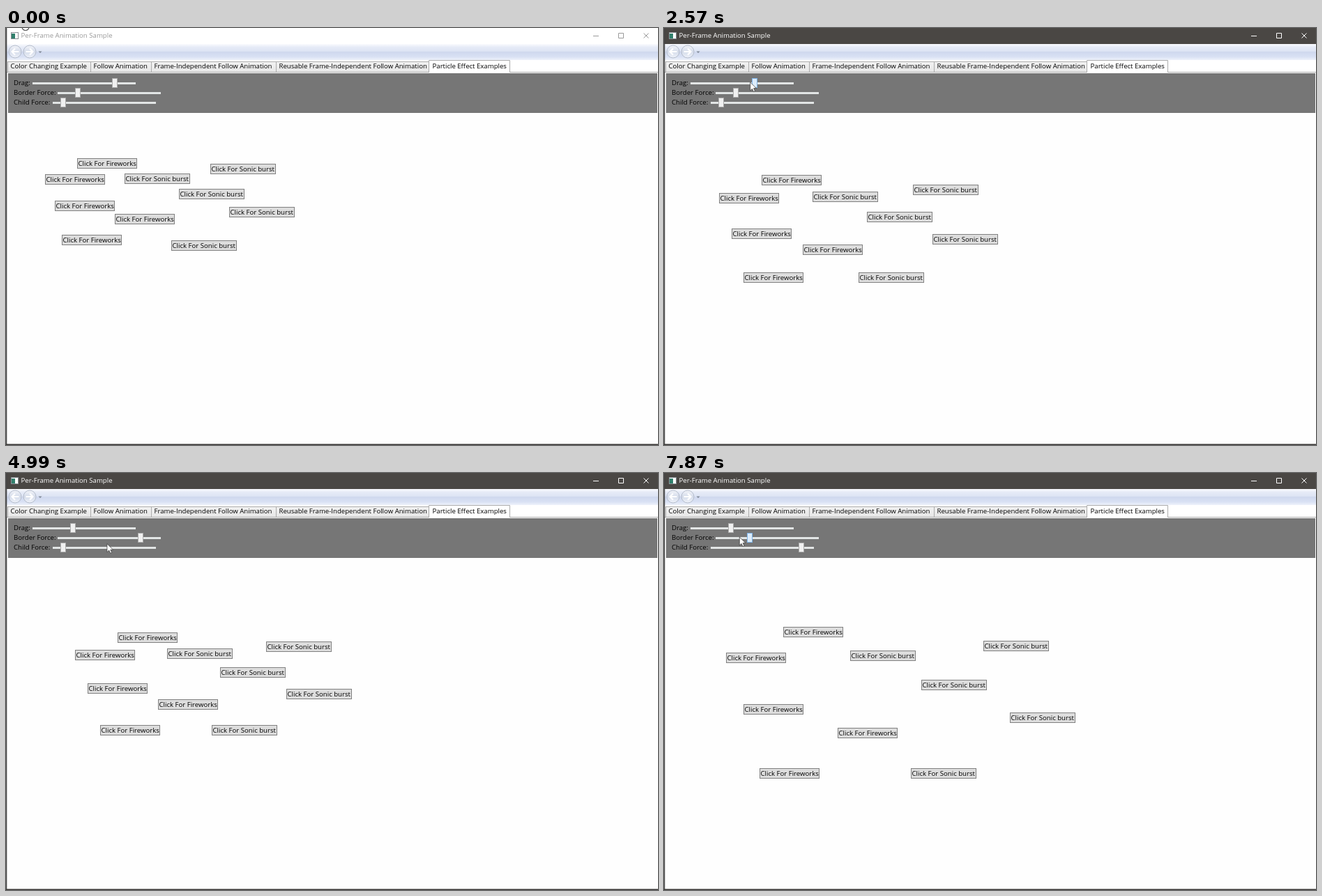
An HTML page that plays this animation: 935x599 px, repeating every 8000 ms.

```html
<!DOCTYPE html>
<html lang="en">
<head>
<meta charset="utf-8">
<title>Per-Frame Animation Sample</title>
<style>
  html, body { margin: 0; width: 100%; height: 100%; overflow: hidden; background: #fff; }
  svg { display: block; width: 935px; height: 599px; }
  text { font: 9.62px "Open Sans", "Noto Sans", sans-serif; fill: #000; white-space: pre; }
  .title { --ink: #999; }
  .title.on { --ink: #fff; }
  .title .bar { fill: #fff; }
  .title.on .bar { fill: #4a4744; }
  .title text { fill: var(--ink); }
  .title path { fill: none; stroke: var(--ink); }
  .tab { fill: url(#tabFill); stroke: #acacac; }
  .track { fill: #e2e5e5; }
  .thumb { fill: #f0f0f0; stroke: #acacac; }
  .thumb.hot { fill: #dcecfc; stroke: #7eb4ea; }
  .btn rect { fill: #ddd; stroke: #808080; }
</style>
</head>
<body>
<svg viewBox="0 0 935 599">
  <defs>
    <linearGradient id="navFill" x2="0" y2="1">
      <stop offset="0" stop-color="#fafbfe"/>
      <stop offset=".2" stop-color="#e6ebf7"/>
      <stop offset=".45" stop-color="#dde4f4"/>
      <stop offset=".5" stop-color="#cfd8ee"/>
      <stop offset=".8" stop-color="#d9e1f4"/>
      <stop offset="1" stop-color="#eef2fb"/>
    </linearGradient>
    <linearGradient id="tabFill" x2="0" y2="1">
      <stop offset="0" stop-color="#f2f2f2"/>
      <stop offset="1" stop-color="#e6e6e6"/>
    </linearGradient>
    <linearGradient id="discFill" x2="0" y2="1">
      <stop offset="0" stop-color="#f3f5fa"/>
      <stop offset=".5" stop-color="#d5dcea"/>
      <stop offset="1" stop-color="#eef2fa"/>
    </linearGradient>
  </defs>

  <rect width="935" height="599" fill="#fefefe"/>

  <g id="title" class="title">
    <rect class="bar" width="935" height="23"/>
    <rect x="7.5" y="6.5" width="10" height="9" fill="#fff" stroke="#8a9096"/>
    <rect x="8" y="8" width="5" height="7" fill="#31806c"/>
    <text x="21.5" y="14">Per-Frame Animation Sample</text>
    <path d="M842 11.5h8M878.5 7.5h7v7h-7zM914.5 7.5l7 7M921.5 7.5l-7 7"/>
  </g>

  <rect y="23" width="935" height="23" fill="url(#navFill)"/>
  <g fill="url(#discFill)" stroke="#b4bccb">
    <circle cx="13" cy="34" r="9"/>
    <circle cx="34" cy="34" r="9"/>
  </g>
  <path d="M18.5 34H8.5M13 29.5L8.5 34L13 38.5M28.5 34h10M34 29.5L38.5 34L34 38.5"
        fill="none" stroke="#fff" stroke-width="2.2"/>
  <path d="M46.5 33.5h5l-2.5 2.5z" fill="#7d8594"/>

  <rect y="46" width="935" height="19" fill="#fff"/>
  <path d="M1 63.5H935" stroke="#acacac"/>
  <g id="tabs"></g>

  <rect x="3" y="65" width="931" height="57" fill="#767676"/>
  <g id="sliders"></g>
  <g id="buttons"></g>

  <rect width="1.3" height="599" fill="#444"/>
  <rect y="597.5" width="935" height="1.5" fill="#3a3836"/>
  <circle id="ring" cx="28" cy="-1.5" r="5" fill="#fff" stroke="#555" stroke-width="1.2"/>
  <path id="cursor" d="M0 0V12L2.8 9.4L4.8 13.6L6.8 12.7L4.9 8.6H8.7Z"
        fill="#fff" stroke="#333" stroke-width=".7"/>
</svg>
<script>
const $ = id => document.getElementById(id);
const mix = (a, b, k) => a + (b - a) * k;
const clamp = k => Math.min(1, Math.max(0, k));

function add(parent, tag, attrs, text) {
  const el = document.createElementNS('http://www.w3.org/2000/svg', tag);
  for (const k in attrs) el.setAttribute(k, attrs[k]);
  if (text) el.textContent = text;
  return parent.appendChild(el);
}

// Tabs: left edge, right edge, label, selected
[
  [2, 121, 'Color Changing Example'],
  [121, 208, 'Follow Animation'],
  [208, 387, 'Frame-Independent Follow Animation'],
  [387, 606, 'Reusable Frame-Independent Follow Animation'],
  [606, 722, 'Particle Effect Examples', true]
].forEach(([l, r, label, open]) => {
  if (open) {
    add($('tabs'), 'path', { d: `M${l + .5} 64V46.5H${r + .5}V64`, fill: '#fff', stroke: '#acacac' });
  } else {
    add($('tabs'), 'rect', { class: 'tab', x: l + .5, y: 48.5, width: r - l, height: 15 });
  }
  add($('tabs'), 'text', { x: l + (open ? 5.5 : 4.5), y: 58 }, label);
});

const sliders = [
  { label: 'Drag:', x: 38, value: 156 },
  { label: 'Border Force:', x: 74, value: 103 },
  { label: 'Child Force:', x: 67, value: 82 }
];
sliders.forEach((s, i) => {
  s.y = 79 + 14 * i;
  add($('sliders'), 'text', { x: 11, y: s.y + 3 }, s.label);
  add($('sliders'), 'rect', { class: 'track', x: s.x, y: s.y - 1, width: 148, height: 3 });
  s.thumb = add($('sliders'), 'rect', { class: 'thumb', y: s.y - 6.5, width: 7, height: 13 });
});

// Each drag moves one slider; the thumb trails the pointer by LAG
const LAG = 100;
const drags = [
  { on: 0, from: 2090, to: 2900, x0: 156, x1: 96, grip: -1 },
  { on: 1, from: 3310, to: 4550, x0: 103, x1: 193, grip: 6 },
  { on: 2, from: 5750, to: 6800, x0: 82, x1: 197, grip: -2 },
  { on: 1, from: 7320, to: 8000, x0: 193, x1: 87, grip: -1 }
];
const pointer = [[0, 28, -2], [1010, 45, 10]];
for (const d of drags) {
  const y = sliders[d.on].y + d.grip;
  pointer.push([d.from - 250, d.x0 + 1, y], [d.from, d.x0 + 1, y], [d.to, d.x1 + 1, y]);
}

// Buttons: kind, start x,y and the x,y they settle at
const buttons = [
  ['F', 102, 187, 144, 214], ['F', 56, 210, 81, 240],
  ['S', 170, 209, 217, 238], ['S', 293, 195, 363, 228],
  ['S', 248, 231, 295, 267], ['F', 70, 248, 100, 292],
  ['F', 156, 267, 203, 316], ['S', 320, 257, 392, 300],
  ['F', 80, 297, 118, 356], ['S', 237, 305, 283, 356]
].map(([kind, x0, y0, x1, y1]) => {
  const el = add($('buttons'), 'g', { class: 'btn' });
  const fire = kind === 'F';
  add(el, 'rect', { x: .5, y: .5, width: fire ? 85 : 93, height: 14 });
  add(el, 'text', { x: 1.5, y: 11 }, fire ? 'Click For Fireworks' : 'Click For Sonic burst');
  return { el, x0, y0, x1, y1 };
});

// After settling the whole group shifts and stretches about its centre:
// time, shift x, shift y, stretch x, stretch y
const SETTLED = 3310, CX = 220, CY = 281;
const group = [
  [SETTLED, 0, 0, 0, 0],
  [4390, 7, 5.5, 0, -.01],
  [5750, 25.5, 19.5, -.066, -.138],
  [6970, 40.5, 29.5, .15, .18],
  [7870, 51, 35.5, .31, .428]
];

function segment(keys, t) {
  let i = 0;
  while (i < keys.length - 2 && keys[i + 1][0] <= t) i++;
  return [i, clamp((t - keys[i][0]) / (keys[i + 1][0] - keys[i][0]))];
}

function linear(keys, t, col) {
  const [i, k] = segment(keys, t);
  return mix(keys[i][col], keys[i + 1][col], k);
}

// Monotone cubic through the keys
function smooth(keys, t, col) {
  const slope = i => (keys[i + 1][col] - keys[i][col]) / (keys[i + 1][0] - keys[i][0]);
  const tangent = i => {
    if (i === 0) return slope(0);
    if (i === keys.length - 1) return slope(i - 1);
    const a = slope(i - 1), b = slope(i);
    return a * b <= 0 ? 0 : 2 * a * b / (a + b);
  };
  const [i, k] = segment(keys, t);
  const h = keys[i + 1][0] - keys[i][0], r = 1 - k;
  return keys[i][col] * (1 + 2 * k) * r * r + keys[i + 1][col] * k * k * (3 - 2 * k)
    + h * k * r * (tangent(i) * r - tangent(i + 1) * k);
}

function drawSliders(t) {
  for (const s of sliders) {
    s.now = s.value;
    s.hot = false;
  }
  for (const d of drags) {
    const s = sliders[d.on];
    const k = (t - LAG - d.from) / (d.to - d.from);
    if (k > 0) s.now = mix(d.x0, d.x1, clamp(k));
    if (t > d.from - 200 && t < d.to + 200) s.hot = true;
  }
  for (const s of sliders) {
    s.thumb.setAttribute('x', Math.round(s.now) - 3.5);
    s.thumb.classList.toggle('hot', s.hot);
  }
}

function drawButtons(t) {
  const settle = 1 - (1 - clamp(t / SETTLED)) ** 1.63;
  const [dx, dy, sx, sy] = [1, 2, 3, 4].map(col => smooth(group, t, col));
  for (const b of buttons) {
    const x = mix(b.x0, b.x1, settle) + dx + sx * (b.x1 - CX);
    const y = mix(b.y0, b.y1, settle) + dy + sy * (b.y1 - CY);
    b.el.setAttribute('transform', `translate(${Math.round(x)} ${Math.round(y)})`);
  }
}

function draw(t) {
  $('title').classList.toggle('on', t >= 2250);
  $('ring').style.display = t < 110 ? '' : 'none';
  $('cursor').style.display = t < 110 ? 'none' : '';
  $('cursor').setAttribute('transform', `translate(${linear(pointer, t, 1)} ${linear(pointer, t, 2)})`);
  drawSliders(t);
  drawButtons(t);
}

// The screen refreshes at a steady pace, on whole hundredths of a second
const LOOP = 8000, FIRST = 110, PACE = 152.16;
function refresh(t) {
  const tick = n => Math.floor((FIRST + n * PACE) / 10) * 10;
  if (t < FIRST) return 0;
  const n = Math.floor((t - FIRST) / PACE);
  return tick(n + 1) <= t ? tick(n + 1) : tick(n);
}

const start = performance.now();
function play() {
  draw(refresh(Math.max(0, performance.now() - start) % LOOP));
  requestAnimationFrame(play);
}
play();
</script>
</body>
</html>
```
